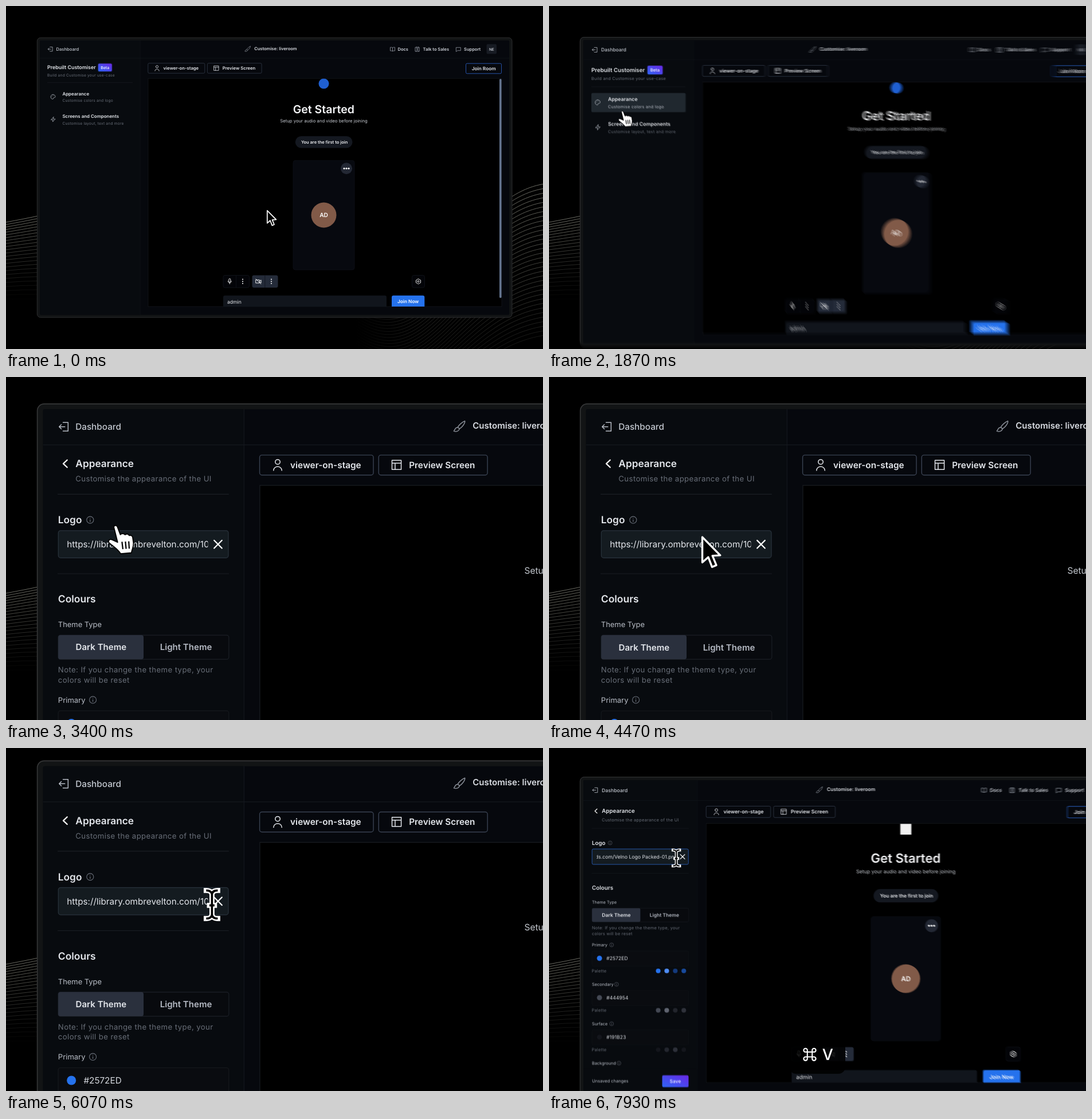
Write an HTML page that moves like this. It is 937 px wide and 598 px high and loops after 8 s.

```html
<!DOCTYPE html>
<html lang="en">
<head>
<meta charset="utf-8">
<title>Customiser demo</title>
<style>
  html, body { margin: 0; width: 100%; height: 100%; overflow: hidden; background: #000; }
  svg { display: block; width: 100vw; height: 100vh; }
  text { font-family: Inter, "Noto Sans", sans-serif; text-rendering: geometricPrecision; white-space: pre; }
</style>
</head>
<body>
<svg id="stage" viewBox="0 0 937 598"></svg>
<script>
const LOOP = 8000, COPIES = 6;
const INK = '#e4e7ec', SOFT = '#b6bbc4', DIM = '#686e78', LINE = '#1b1f25';

// Markup helpers; text is placed by its vertical centre
const text = (x, y, str, size, fill = INK, weight = 400, extra = '') =>
  `<text x="${x}" y="${(y + size * .36).toFixed(2)}" font-size="${size}" fill="${fill}" font-weight="${weight}" ${extra}>${str}</text>`;
const mid = (x, y, str, size, fill, weight) => text(x, y, str, size, fill, weight, 'text-anchor="middle"');
const note = (x, y, str, size = 6.57, extra = '') => text(x, y, str, size, DIM, 400, `letter-spacing=".2" ${extra}`);
const rect = (x, y, x2, y2, rx, fill, extra = '') =>
  `<rect x="${x}" y="${y}" width="${(x2 - x).toFixed(2)}" height="${(y2 - y).toFixed(2)}" rx="${rx}" fill="${fill}" ${extra}/>`;
const dot = (x, y, r, fill, extra = '') => `<circle cx="${x}" cy="${y}" r="${r}" fill="${fill}" ${extra}/>`;
const icon = (x, y, d, stroke = SOFT, w = .75) =>
  `<path transform="translate(${x} ${y})" d="${d}" fill="none" stroke="${stroke}" stroke-width="${w}" stroke-linecap="round" stroke-linejoin="round"/>`;
const rule = (y, x1 = 72, x2 = 221) => `<path d="M${x1} ${y}H${x2}" stroke="${LINE}" stroke-width=".6"/>`;
const info = (x, y) => dot(x, y, 3, 'none', `stroke="${DIM}" stroke-width=".55"`) + icon(x, y, 'M0 -.2V1.5M0 -1.5V-1.4', DIM, .6);
const dots = (x, y, dx, dy, r) => [-1, 0, 1].map(k => dot(x + k * dx, y + k * dy, r, '#fff')).join('');

const ICONS = {
  exit: 'M-.8 -3.7H3.6V3.7H-.8M.8 0H-4.2M-2.3 -1.9L-4.2 0L-2.3 1.9',
  brush: 'M4.6 -4.6C2.5 -4 -.8 -.8 -1.6 .8L0 2.2C2 1 5 -2.4 4.6 -4.6M-1.8 1C-3.8 .8 -4 3 -5 4.2C-2.6 5 -.4 4 -.2 2.3',
  book: 'M0 -2.6C-1 -3.4 -2.5 -3.4 -4 -3.2V2.8C-2.5 2.6 -1 2.8 0 3.4C1 2.8 2.5 2.6 4 2.8V-3.2C2.5 -3.4 1 -3.4 0 -2.6V3.4',
  contact: 'M-3.4 -3.2H3.4V3.8H-3.4ZM-1.5 -4.2V-2.4M1.5 -4.2V-2.4M-2 3.6C-1.6 1 1.6 1 2 3.6M-1.2 -.4A1.2 1.2 0 1 0 1.2 -.4A1.2 1.2 0 1 0 -1.2 -.4',
  chat: 'M-3.8 -3H3.8V2.4H-1.4L-3.8 4Z',
  person: 'M-2.1 -2.6A2.1 2.1 0 1 0 2.1 -2.6A2.1 2.1 0 1 0 -2.1 -2.6M-3.6 4.8C-3.6 .4 3.6 .4 3.6 4.8',
  layout: 'M-4 -4H4V4H-4ZM-4 -1.5H4M-1.3 -1.5V4',
  palette: 'M0 -4C-5.4 -4 -5.2 4 -.4 4C1.4 4 -.4 1.6 1.6 1.5C3.4 1.5 4 1 4 -.4C4 -2.6 2.2 -4 0 -4M-2.2 0V.1M-1.2 -2V-1.9M1.2 -2V-1.9',
  bolt: 'M.6 -4.2L-3.8 .7H-.4L-.8 4.2L3.8 -.7H.4Z',
  back: 'M1.8 -3.2L-1.6 0L1.8 3.2',
  cross: 'M-3.4 -3.4L3.4 3.4M3.4 -3.4L-3.4 3.4',
  mic: 'M-1.5 -3.2A1.5 1.5 0 0 1 1.5 -3.2V0A1.5 1.5 0 0 1 -1.5 0ZM-3 -.4C-3 3.6 3 3.6 3 -.4M0 2.7V4.6',
  camOff: 'M-4.4 -2.6H1.8V2.8H-4.4ZM1.8 -.7L4.6 -2.4V2.6L1.8 .9M-4.6 -4.2L4.4 4.4',
  gear: 'M0 -4.4L2 -3.4L4 -2.2V2.2L2 3.4L0 4.4L-2 3.4L-4 2.2V-2.2L-2 -3.4ZM-1.5 0A1.5 1.5 0 1 0 1.5 0A1.5 1.5 0 1 0 -1.5 0'
};

function waves() {
  let out = '';
  for (let i = 0; i < 24; i++) {
    const drop = 4 * i + .08 * i * i;
    out += `<path d="M0 ${377 + drop}Q30 ${371.5 + drop * 1.03} 56 ${366 + drop * 1.08}" stroke="#8b8b80" opacity="${(.85 * (1 - i / 24)).toFixed(2)}"/>`;
  }
  for (let i = 0; i < 34; i++)
    out += `<path d="M600 ${500 + 5 * i}C740 ${610 + 5 * i} 790 ${332 + 8 * i} 940 ${310 + 8 * i}" stroke="url(#fade)" opacity="${(.85 - i * .02).toFixed(2)}"/>`;
  return `<g fill="none" stroke-width=".9">${out}</g>`;
}

function frame() {
  const tools = [['book', 674.5, 'Docs', 683.5], ['contact', 717.8, 'Talk to Sales', 727.5], ['chat', 789.5, 'Support', 799]];
  return rect(54.3, 55.3, 883, 543, 6, '#121415', 'stroke="#363738" stroke-width=".8"') +
    rect(59.3, 60, 878.3, 538.5, 2, '#06080d') +
    rect(59.3, 60, 234, 538.5, 1, '#080b0f') +
    `<path d="M234.2 60V538.5M59.3 91H878.3" stroke="#14181e" stroke-width=".6"/>` +
    icon(77.5, 75.2, ICONS.exit) + text(87.5, 75.2, 'Dashboard', 7.64, '#c3c8d0', 500) +
    icon(421.8, 74.8, ICONS.brush, '#8a8f98') + text(433.2, 74.1, 'Customise: liveroom', 7.52, '#d9dce2', 600) +
    tools.map(([k, x, s, tx]) => icon(x, 75.3, ICONS[k], '#9ba1ab') + text(tx, 75.2, s, 7.5, '#cdd1d8', 600)).join('') +
    rect(838.5, 66.5, 856, 83.5, 2, '#171b23') + mid(847.3, 75.2, 'NE', 6.4, '#c3c8d0', 600) +
    rect(247.8, 99.8, 346.8, 117.2, 2, '#06080d', 'stroke="#394252" stroke-width=".7"') +
    icon(263.5, 108.4, ICONS.person, INK) + text(274.5, 108.4, 'viewer-on-stage', 7.66, INK, 600) +
    rect(351.4, 99.8, 446.1, 117.2, 2, '#06080d', 'stroke="#394252" stroke-width=".7"') +
    icon(367, 108.4, ICONS.layout, INK) + text(377.8, 108.4, 'Preview Screen', 7.66, INK, 600) +
    rect(802.5, 100.2, 864.5, 117.8, 2, '#06080d', 'stroke="#2a5cb8" stroke-width=".9"') +
    mid(833.7, 108.8, 'Join Room', 8.3, INK, 600);
}

function preview() {
  return rect(248, 126.2, 865, 524, 0, '#000', 'stroke="#1a1d22" stroke-width=".6"') +
    `<g clip-path="url(#view)">` +
    dot(554.5, 135.3, 9, '#1f5fd0', 'id="mark"') + rect(546, 127, 563, 143.5, 0, '#f2f2f2', 'id="newMark"') +
    mid(554.3, 179.5, 'Get Started', 19.5, '#f4f5f7', 600) +
    mid(554.5, 200.1, 'Setup your audio and video before joining', 7.74, '#c3c7ce') +
    rect(504.8, 227, 604.5, 247.5, 10.2, '#141820') + mid(555.6, 237.3, 'You are the first to join', 7.5, '#eceef1', 600) +
    rect(501, 269.3, 608, 460, 4, '#07090f', 'stroke="#10131a" stroke-width=".7"') +
    dot(594, 283.3, 10, '#232834') + dots(594, 283.3, 4, 0, 1.5) +
    dot(554.5, 364.5, 22, '#815a48') + mid(554.6, 364.6, 'AD', 10.2, '#fff', 600) +
    rect(379, 469.5, 424.5, 491, 3, '#030408', 'stroke="#151920" stroke-width=".7"') + `<path d="M401.6 470V491" stroke="#151920" stroke-width=".7"/>` +
    icon(390.3, 480, ICONS.mic, '#fff', .9) + dots(413, 480.2, 0, 3.6, 1) +
    rect(429.5, 469.5, 474.5, 491, 3, '#242b39') + `<path d="M451.8 469.5V491" stroke="#10141d" stroke-width=".8"/>` +
    icon(440.5, 480.2, ICONS.camOff, '#fff', .9) + dots(463, 480.2, 0, 3.6, 1) +
    rect(708.5, 469.5, 730.5, 491, 3, '#030408', 'stroke="#151920" stroke-width=".7"') + icon(719.5, 480.2, ICONS.gear, '#fff', .9) +
    rect(379, 504.7, 664, 530, 3, '#11151c') + text(386, 515.5, 'admin', 8.6, '#e8eaee') +
    rect(673, 504.7, 730.3, 530, 3, '#2572ed') + mid(701.6, 515.5, 'Join Now', 8.3, '#fff', 600) +
    rect(861, 127, 864.6, 509, 1.8, '#64748f') + `</g>`;
}

function menu() {
  return `<g id="menu">` + text(72, 107.2, 'Prebuilt Customiser', 8.9, INK, 600) +
    rect(159.6, 99.2, 186, 115.2, 3.5, 'url(#grad)', 'opacity=".16"') +
    rect(160.9, 100.4, 184.7, 114, 2, 'url(#grad)') + mid(172.7, 107.1, 'Beta', 6.9, '#fff', 500) +
    note(72, 120.5, 'Build and Customise your use-case', 6.65) + rule(133.6) +
    rect(72, 143.4, 221.3, 173.8, 2, '#20282f', 'id="hover"') +
    icon(82, 158.3, ICONS.palette) + text(98.4, 153.2, 'Appearance', 7.93, INK, 600) +
    note(98.4, 165.1, 'Customise colors and logo', 6.65, 'id="hoverNote"') +
    icon(82.3, 197.7, ICONS.bolt) + text(98.4, 192.5, 'Screens and Components', 7.93, INK, 600) +
    note(98.4, 204.4, 'Customise layout, text and more', 6.65) + `</g>`;
}

function swatch(y, name, value, colours) {
  return text(72.4, y, name, 6.5, '#b9bec7') + info(72.4 + name.length * 3.75 + 4, y) +
    rect(72.5, y + 9.5, 221, y + 32.6, 2, '#0a0c10', 'stroke="#16191d" stroke-width=".6"') +
    dot(84, y + 20.5, 4, colours[0]) + text(94.6, y + 20.6, value, 7.64, '#d5d8de') +
    note(72, y + 39.8, 'Palette') + colours.map((c, k) => dot(174.2 + 13.1 * k, y + 39.9, 3.6, c)).join('');
}

function panel() {
  return `<g id="panel">` + icon(78.5, 107.3, ICONS.back, '#fff', 1.1) + text(87.6, 107.3, 'Appearance', 8.6, INK, 600) +
    note(87.6, 120.5, 'Customise the appearance of the UI') + rule(133.9) +
    text(72.4, 156.2, 'Logo', 8.6, INK, 600) + info(100.3, 156.2) +
    rect(72.6, 165.5, 220.6, 189.2, 2, '#141b20', 'id="field"') +
    `<g clip-path="url(#entry)">` +
    text(80, 177.4, 'https://library.ombrevelton.com/1048', 7.64, INK, 400, 'id="before"') +
    text(203.6, 177.4, 'https://ombrevelds.com/Velno Logo Packed-01.png', 7.64, INK, 400, 'id="after" text-anchor="end"') + `</g>` +
    icon(211.6, 177.4, ICONS.cross, '#fff', 1.1) + rule(203) +
    text(72.4, 225, 'Colours', 8.7, INK, 600) + text(72.4, 247.2, 'Theme Type', 6.45, '#b9bec7') +
    rect(72.5, 256.4, 221, 277.4, 2, '#080a0e', 'stroke="#1b1f26" stroke-width=".6"') +
    rect(72.5, 256.4, 146.8, 277.4, 2, '#2a303d') +
    mid(109.8, 266.9, 'Dark Theme', 7.5, INK, 600) + mid(183.7, 266.9, 'Light Theme', 7.5, '#b5bac4', 600) +
    note(72.4, 286.5, 'Note: If you change the theme type, your') + note(72.4, 295.4, 'colors will be reset') +
    swatch(312.7, 'Primary', '#2572ED', ['#2572ed', '#4f8df5', '#143a7c', '#184a9c']) +
    swatch(373.2, 'Secondary', '#444954', ['#444954', '#5f6470', '#22252c', '#2f323b']) +
    swatch(433.7, 'Surface', '#191B23', ['#14161c', '#23262e', '#2d3039', '#14161c']) +
    swatch(494.2, 'Background', '#0B0E15', ['#0b0e15']) +
    rect(59.5, 503, 233.8, 538.3, 0, '#080b0f') + text(72.6, 521.5, 'Unsaved changes', 6.6, '#b9bec7') +
    rect(180.3, 512.8, 220.8, 531, 2, 'url(#grad)') + mid(200.5, 521.8, 'Save', 7.4, '#dfe3ff', 600) + `</g>`;
}

function pointers() {
  const beam = 'M-5 -12.2C-2 -12.2 0 -11 0 -8.4C0 -11 2 -12.2 5 -12.2M0 -8.4V8.4M-5 12.2C-2 12.2 0 11 0 8.4C0 11 2 12.2 5 12.2M-2.2 .8H2.2';
  return `<g id="pointer" stroke-linejoin="round">
    <path id="arrow" d="M.8 1.6V23.6L6 19L9.3 27.6L13 26L9.6 17.8L16.4 17.4Z" fill="#000" stroke="#fff" stroke-width="1.7"/>
    <g id="hand"><path d="M-.2 1.6C-.6 -.3 2 -.9 2.8 1L5.4 7.8C6.4 6.6 8.8 6.6 9.5 7.9C10.7 6.9 12.6 7.2 13.1 8.6C14.5 8 15.8 8.8 16.1 10.2L16.8 15C17 18.6 15.6 20.2 15 23.6L5.6 24.4C3.8 20.6 -1.8 17.4 -4.5 14.8C-5.8 12.8 -3.6 11.2 -1.6 12.4L3 14.4Z" fill="#fff" stroke="#000" stroke-width=".9"/>
    <path d="M6.8 14L7.6 20.4M9.8 13.8L10.4 20.2M12.7 13.6L13.1 20" stroke="#000" stroke-width="1.1"/></g>
    <g id="beam" fill="none"><path d="${beam}" stroke="#fff" stroke-width="4.4" stroke-linecap="square"/><path d="${beam}" stroke="#000" stroke-width="1.8"/></g>
  </g>`;
}

const stage = document.getElementById('stage');
stage.innerHTML = `<defs>
  <linearGradient id="grad" x1="0" y1="1" x2="1" y2="0"><stop stop-color="#2f66f5"/><stop offset="1" stop-color="#6a29e6"/></linearGradient>
  <linearGradient id="fade" gradientUnits="userSpaceOnUse" x1="610" y1="0" x2="900" y2="0">
    <stop stop-color="#8b8b80" stop-opacity="0"/><stop offset="1" stop-color="#8b8b80"/></linearGradient>
  <clipPath id="view"><rect x="248" y="126.4" width="617" height="397.6"/></clipPath>
  <clipPath id="entry"><rect x="79.6" y="167" width="123.2" height="21"/></clipPath>
  <g id="scene">${frame() + preview() + menu() + panel() + pointers()}</g>
</defs>
<rect width="937" height="598"/>${waves()}
${'<use href="#scene"/>'.repeat(COPIES)}
<g id="keys">${rect(419, 499, 517, 568, 12, '#000', 'fill-opacity=".88"')}
  <path transform="translate(455 534.3) scale(1.06)" fill="none" stroke="#fff" stroke-width="2" d="M-4 -7V7M4 -7V7M-7 -4H7M-7 4H7M-4 -7A3 3 0 1 0 -7 -4M4 -7A3 3 0 1 1 7 -4M-4 7A3 3 0 1 1 -7 4M4 7A3 3 0 1 0 7 4"/>
  ${mid(486.3, 534.3, 'V', 27, '#fff', 500)}</g>`;

const el = id => document.getElementById(id);
const show = (id, on) => el(id).setAttribute('display', on ? 'inline' : 'none');
const layers = [...stage.querySelectorAll('use')];

// Critically damped spring from 0 to 1
const spring = (t, start, w) => {
  const d = Math.max(0, t - start) / 1000 * w;
  return 1 - (1 + d) * Math.exp(-d);
};
const zoom = t => 1 + 1.005 * (spring(t, 1797, 7.3) - spring(t, 7470, 7.6));

// Pointer moves: start, end, from, to
const MOVES = [
  [900, 1800, [455, 355], [119.8, 173]],
  [1800, 2250, [119.8, 173], [121.2, 161.2]],
  [4250, 5080, [121.2, 161.2], [341.3, 209]],
  [5400, 6150, [341.3, 209], [202, 179.3]]
];
function pointerAt(t) {
  let pos = MOVES[0][2];
  for (const [a, b, from, to] of MOVES) {
    if (t < a) break;
    const k = Math.min(1, (t - a) / (b - a)), e = k * k * (3 - 2 * k);
    pos = from.map((v, n) => v + (to[n] - v) * e);
  }
  return pos;
}

function draw(t) {
  const opened = t >= 2700, focused = t >= 6250, pasted = t >= 6950;
  const hover = t >= 1620 && !opened;
  show('menu', !opened);
  show('panel', opened);
  show('hover', hover);
  el('hoverNote').setAttribute('fill', hover ? '#b9bec7' : DIM);
  show('before', !pasted);
  show('after', pasted);
  show('mark', !pasted);
  show('newMark', pasted);
  el('field').setAttribute('stroke', focused ? '#2a5fb8' : '#29333c');
  el('field').setAttribute('stroke-width', focused ? .8 : .6);
  show('keys', t >= 6900);

  const kind = t >= 6000 ? 'beam' : t >= 1620 && t < 4350 ? 'hand' : 'arrow';
  for (const k of ['arrow', 'hand', 'beam']) show(k, k === kind);
  const [x, y] = pointerAt(t);
  el('pointer').setAttribute('transform', `translate(${x} ${y})`);

  // Camera with a short shutter, averaged over the layers
  const focusY = 63.7 + 24.4 * spring(t, 4590, 7.2);
  const s = zoom(t), spread = zoom(t + 3) - zoom(t - 3);
  const blurred = Math.abs(spread) > .0008;
  layers.forEach((layer, i) => {
    const z = blurred ? s + spread * (i / (COPIES - 1) - .5) : s;
    layer.setAttribute('display', i && !blurred ? 'none' : 'inline');
    layer.setAttribute('opacity', 1 / (i + 1));
    layer.setAttribute('transform', `translate(${54 * (1 - z)} ${focusY * (1 - z)}) scale(${z})`);
  });
}

const begin = performance.now();
function tick() {
  draw((performance.now() - begin) % LOOP);
  requestAnimationFrame(tick);
}
tick();
</script>
</body>
</html>
```
